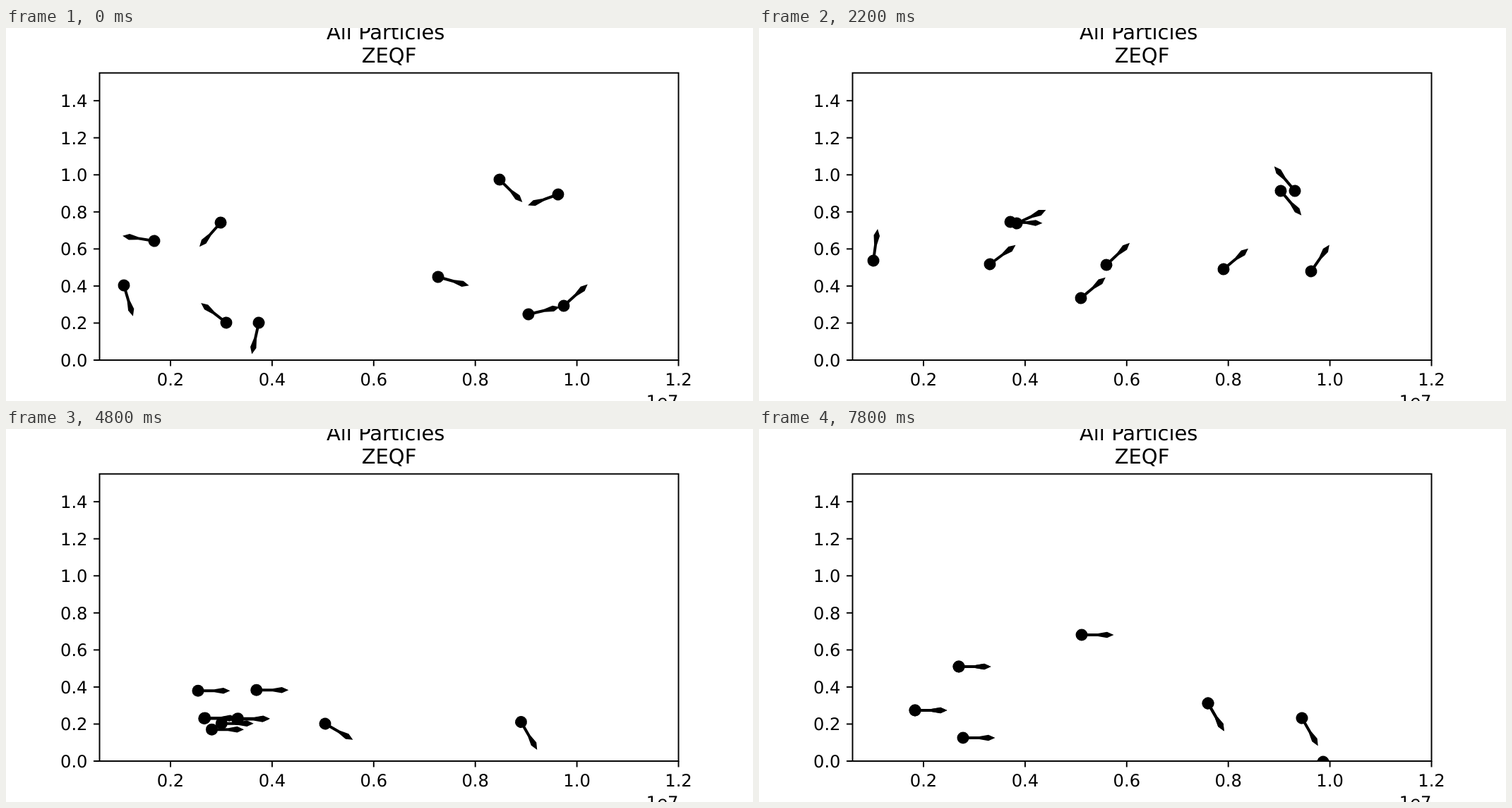
An HTML page for the animation above (8 s loop, 1058 by 529 pixels).

```html
<!DOCTYPE html>
<html lang="en">
<head>
<meta charset="utf-8">
<title>All Particles</title>
<style>
  html, body { margin: 0; width: 100%; height: 100%; overflow: hidden; background: #fff; }
  svg { display: block; width: 100%; height: 100%; }
  text { font: 24.2px "DejaVu Sans", sans-serif; text-rendering: geometricPrecision; }
  .title { font-size: 29px; text-anchor: middle; }
  .right { text-anchor: end; }
  .middle { text-anchor: middle; }
  .line { fill: none; stroke: #000; stroke-width: 1.95; }
</style>
</head>
<body>
<svg id="stage" viewBox="0 0 1058 529">
  <clipPath id="plot"><rect x="132.5" y="63.7" width="820" height="407.3"/></clipPath>
  <g id="swarm" clip-path="url(#plot)"></g>
  <rect class="line" x="132.5" y="63.7" width="820" height="407.3"/>
  <text class="title" x="537.7" y="15.8">All Particles</text>
  <text class="title" x="542.5" y="49">ZEQF</text>
  <text class="right" x="952.5" y="538">1e7</text>
</svg>
<script>
const LOOP = 8000, STEP = 200, COUNT = 10;
const LEFT = 132.5, BOTTOM = 471;
const stage = document.getElementById("stage");
const swarm = document.getElementById("swarm");

function add(parent, tag, attributes, text = "") {
  const node = document.createElementNS(stage.namespaceURI, tag);
  for (const name in attributes) node.setAttribute(name, attributes[name]);
  node.textContent = text;
  return parent.appendChild(node);
}

for (let i = 0; i < 8; i++) {
  const y = BOTTOM - i * 52.55;
  add(stage, "path", { class: "line", d: `M${LEFT} ${y}h-8.5` });
  add(stage, "text", { class: "right", x: 115.5, y: y + 9 }, (i / 5).toFixed(1));
}
for (let i = 1; i < 7; i++) {
  const x = 89.1 + i * 143.9;
  add(stage, "path", { class: "line", d: `M${x} ${BOTTOM}v8.5` });
  add(stage, "text", { class: "middle", x, y: 507 }, (i / 5).toFixed(1));
}

const particles = Array.from({ length: COUNT }, () => {
  const group = add(swarm, "g", {});
  add(group, "circle", { r: 8.5 });
  add(group, "path", { d: "M0-2H23L36-4.3 45.5 0 36 4.3 23 2H0Z" });
  return group;
});

// Heading rules, in degrees: a scattered swarm fans out around a mean heading,
// a gathered one drifts right while its stragglers dive.
const fan = (mean, spread, power) => (x, i) => mean + spread * (2 * i / (COUNT - 1) - 1) ** power;
const spin = fan(88, 130, 1);
const rise = fan(-40, 90, 3);
const drift = x => x < 600 ? 0 : 60;

// Particles share key points when there are fewer points than particles.
const pose = (time, heading, points) => ({
  time,
  states: particles.map((_, i) => {
    const [x, y] = points[i % points.length];
    return { x, y, angle: heading(x, i) };
  })
});

const mix = (a, b, k) => a + (b - a) * k;
const turn = (a, b, k) => a + ((b - a + 540) % 360 - 180) * k;
const squash = ([x, y]) => [mix(298, x, 0.5), mix(425, y, 0.25)];

const knot = [[250, 436], [381, 395], [370, 323], [323, 422], [300, 411],
  [245, 321], [290, 422], [289, 428], [270, 394]];

const poses = [
  pose(0, spin, [[790, 394], [740, 406], [612, 353], [699, 215], [167, 365],
    [358, 418], [304, 276], [782, 236], [210, 302], [312, 418]]),
  pose(800, drift, [[735, 401], [440, 440], [415, 380], [405, 443], [206, 389],
    [332, 398], [292, 335], [408, 440], [281, 343]]),
  pose(2200, rise, [[759, 231], [162, 330], [782, 345], [492, 336], [456, 383],
    [658, 342], [327, 335], [365, 277], [356, 275], [739, 231]]),
  pose(4000, drift, [[729, 423], ...knot]),
  pose(5600, drift, [[730, 408], [654, 400], ...knot.map(squash)]),
  pose(6600, rise, [[129, 359], [80, 380], [720, 375], [780, 436], [692, 260],
    [592, 336], [718, 253], [760, 315], [216, 410], [450, 286]]),
  pose(7800, drift, [[221, 399], [283, 337], [636, 389], [799, 472], [769, 410],
    [457, 292], [289, 438]])
];

function draw(now) {
  const time = Math.floor(now % LOOP / STEP) * STEP;
  const last = poses.findLastIndex(p => p.time <= time);
  const from = poses[last], to = poses[last + 1] || from;
  const progress = to === from ? 0 : (time - from.time) / (to.time - from.time);
  const eased = progress * progress * (3 - 2 * progress);

  particles.forEach((particle, i) => {
    const a = from.states[i], b = to.states[i];
    const x = mix(a.x, b.x, eased), y = mix(a.y, b.y, eased);
    const angle = turn(a.angle, b.angle, eased);
    particle.setAttribute("transform", `translate(${x} ${y}) rotate(${angle})`);
  });
}

const start = performance.now();
function tick() {
  draw(performance.now() - start);
  requestAnimationFrame(tick);
}
tick();
</script>
</body>
</html>
```
